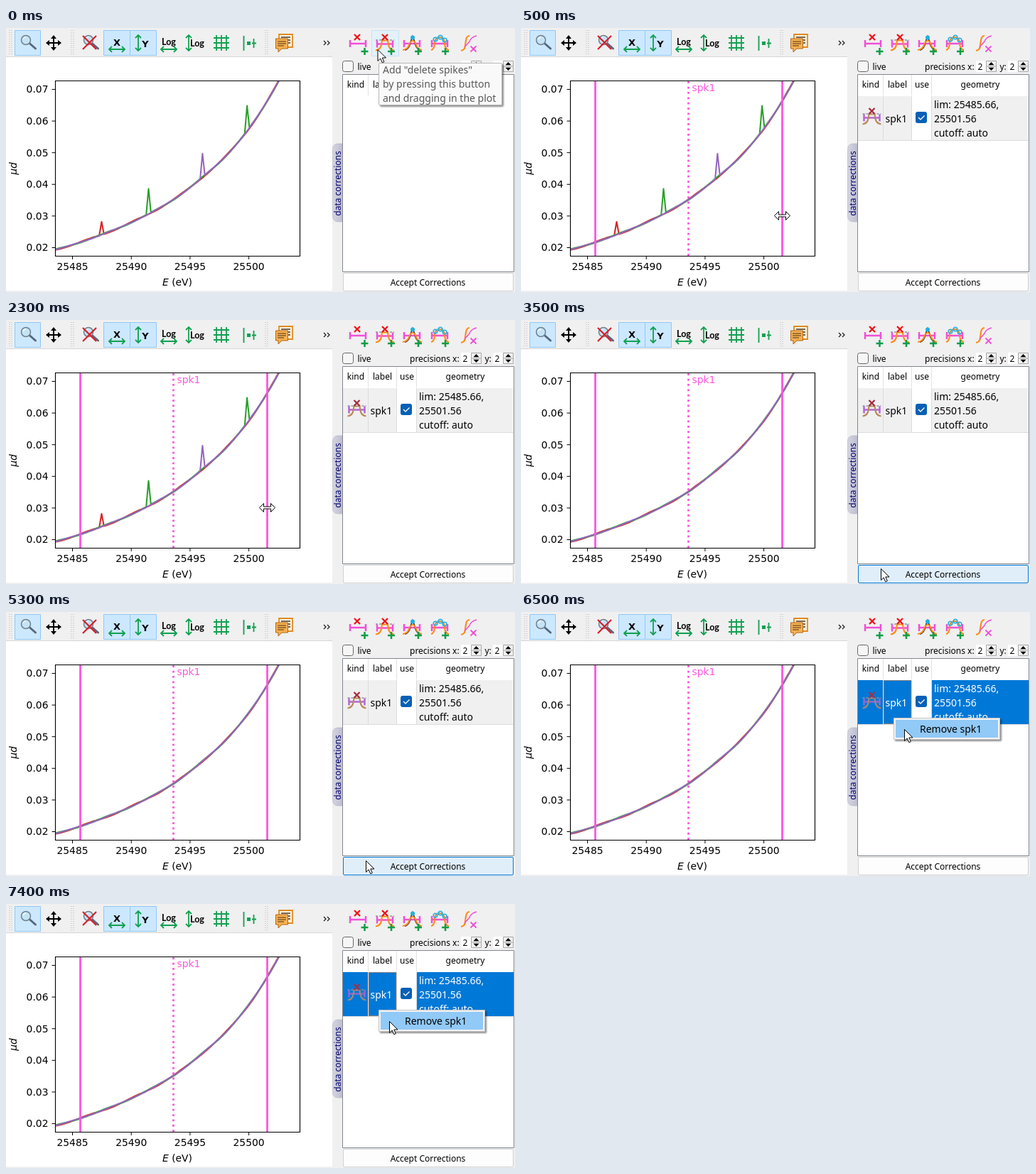
These frames come from a looping animation (716x372 px, 8000 ms). An HTML page:

```html
<!DOCTYPE html>
<html lang="en">
<head>
<meta charset="utf-8">
<title>Deleting spikes</title>
<style>
html, body { margin: 0; width: 100%; height: 100%; overflow: hidden; background: #f0f0f0; }
svg { display: block; width: 716px; height: 372px; }
text { font: 12px "Noto Sans", "Open Sans", sans-serif; }
.plot text { font: 13.89px "DejaVu Sans", sans-serif; }
.plot .italic { font-style: italic; }
.big text, text.big { font-size: 14px; }
.bold text { font: bold 12.5px Lato, sans-serif; }
.bold .axis { font: bold 13px "DejaVu Sans", sans-serif; }
.mid { text-anchor: middle; }
.end { text-anchor: end; }
.line { fill: none; stroke-width: 2.08; stroke-linejoin: round; }
.green { stroke: #10a050; fill: none; stroke-width: 1.8; }
.cross { stroke: var(--cross, #f01018); stroke-width: 2.3; }
.bar { stroke: var(--bar, #f04fd8); stroke-width: 2.5; fill: none; }
.peak { stroke: var(--peak, #ff8c1a); stroke-width: 2.2; fill: none; }
.cut { stroke: #8796a8; stroke-width: 1.4; stroke-dasharray: 3 2; }
.dim { --cross: #a8283c; --bar: #b565d8; --peak: #b98a5c; }
.picked .dim { --cross: #a03048; --bar: #9068d0; --peak: #a08878; }
.picked .cell { fill: #0078d7; }
.picked .ink text { fill: #fff; }
</style>
</head>
<body>
<svg id="stage" viewBox="0 0 716 372">
  <defs>
    <clipPath id="axes"><path d="M69 74H413V321H69Z"/></clipPath>
    <linearGradient id="tab"><stop stop-color="#d4d4e0"/><stop offset="1" stop-color="#bebed2"/></linearGradient>
    <filter id="shadow" x="-10%" y="-20%" width="125%" height="150%">
      <feDropShadow dx="2" dy="2" stdDeviation="1" flood-opacity=".45"/>
    </filter>
    <path id="arrow" d="M.5.5V16.5L4.2 13L6.8 18.8L9.3 17.7L6.8 12H12Z" fill="#fff" stroke="#000"/>
    <path id="x" d="M-4-4L4 4M4-4L-4 4"/>
    <path id="plus" d="M-5 0H5M0-5V5" stroke="#0f9d48" stroke-width="2.5"/>
    <path id="range" class="bar" d="M-11-5V5M11-5V5M-11 0H11"/>
    <path id="h-arrow" d="M-11 0H11M-7-4L-11 0L-7 4M7-4L11 0L7 4"/>
    <g id="spike">
      <path class="cut" d="M-13-5.5H13"/>
      <use href="#range"/>
      <path class="peak" d="M-13 9Q-6 8-5 1L-4-5H4L5 1Q6 8 13 9"/>
      <use href="#x" class="cross" y="-9.5"/>
    </g>
    <g id="lens">
      <path d="M5 4.500L13.500 12" stroke="#56677c" stroke-width="3" stroke-linecap="round"/>
      <circle r="6.500" fill="#c4e4f6" stroke="#72808c" stroke-width="1.500"/>
      <path d="M-4-1A4 4 0 0 1 0-4" fill="none" stroke="#fff" stroke-width="1.500"/>
    </g>
    <g id="spin">
      <path d="M0 0H14V16H0Z" fill="#fff"/>
      <path d="M14.500.500H28.500V15.500H14.500ZM14.500 8H28.500" fill="#f0f0f0" stroke="#a8a8a8"/>
      <path d="M17.500 6.200H25.500L21.500 2ZM17.500 9.800H25.500L21.500 14Z"/>
      <text x="2.500" y="12.500">2</text>
    </g>
  </defs>

  <path d="M0 0H716V372H0Z" fill="#f0f0f0"/>
  <path d="M0 41H459V370H0Z" fill="#fff"/>
  <path d="M0 40.500H459" stroke="#d5d5d5"/>

  <!-- plot toolbar -->
  <path d="M12.500 3.500H48.500V38.500H12.500ZM137.500 3.500H174.500V38.500H137.500ZM174.500 3.500H211.500V38.500H174.500Z" fill="#cce8ff" stroke="#90c8f6"/>
  <path d="M5 3V38M8 3V38M92 3V38M95 3V38M365 3V38M368 3V38" stroke="#b4b4b4" stroke-dasharray="1 2"/>
  <use href="#lens" x="28" y="17"/>
  <path d="M57 21H77M67 11V31" stroke="#000" stroke-width="2"/>
  <path d="M56 21L61 17V25ZM78 21L73 17V25ZM67 10L63 15H71ZM67 32L63 27H71Z"/>
  <use href="#lens" x="116" y="17"/>
  <path d="M108 11L127 30M127 11L108 30" stroke="#d81f2a" stroke-width="2.200"/>
  <g class="bold">
    <text x="156" y="24.500" class="mid axis">X</text>
    <text x="196" y="26.500" class="mid axis">Y</text>
    <text x="229" y="23.500" class="mid">Log</text>
    <text x="269" y="26" class="mid">Log</text>
  </g>
  <g class="green">
    <use href="#h-arrow" x="156" y="30"/>
    <use href="#h-arrow" x="229" y="30"/>
    <use href="#h-arrow" transform="translate(186 21) rotate(90)"/>
    <use href="#h-arrow" transform="translate(257 21) rotate(90)"/>
    <path d="M296 10V32M303 10V32M310 10V32M292 14H314M292 21H314M292 28H314"/>
    <path d="M334.500 11V32M348.500 15V28M346 21.500H352"/>
    <path d="M339 19H344V24H339Z" fill="#10a050" stroke="none"/>
  </g>
  <path d="M384 9H403V27H384Z" fill="#fff3dc" stroke="#e08a24" stroke-width="1.800"/>
  <path d="M387 13H400M387 17H400M392 21H400" stroke="#4a3a2c" stroke-width="1.300"/>
  <path d="M379.500 15H396.500V29H388L383 34V29H379.500Z" fill="#f8b050" stroke="#b06414"/>
  <path d="M382 19H394M382 22H394M382 25H391" stroke="#4a3014" stroke-width="1.200"/>
  <path d="M447 18L450 21L447 24M452 18L455 21L452 24" fill="none" stroke="#222" stroke-width="1.300"/>

  <!-- plot -->
  <g class="plot">
    <g clip-path="url(#axes)">
      <path id="red" class="line" stroke="#d62728"/>
      <path id="green" class="line" stroke="#2ca02c"/>
      <path id="purple" class="line" stroke="#9467bd"/>
      <g data-on="123" stroke="#ff55dd" stroke-width="2.780">
        <path d="M104.500 74V321M367.500 74V321"/>
        <path d="M235.500 321V74" stroke-dasharray="2.780 4.580"/>
        <text x="240.500" y="89" fill="#ff55dd" stroke="none">spk1</text>
      </g>
    </g>
    <path d="M69.500 74.500H413.500V321.500H69.500Z" fill="none" stroke="#000" stroke-width="1.110"/>
    <g id="ticks"></g>
    <text x="241" y="363" class="mid"><tspan class="italic">E</tspan> (eV)</text>
    <text class="mid italic" transform="translate(15 198) rotate(-90)">μd</text>
  </g>

  <!-- side panel -->
  <path d="M473 163H466Q459.500 164 459.500 171V265Q459.500 272 466 273H473Z" fill="url(#tab)" stroke="#b4b4c4" stroke-width=".6"/>
  <text class="mid" fill="#000070" transform="translate(470.500 219) rotate(-90)">data corrections</text>
  <path data-on="0" d="M514.500 3.500H552.500V39.500H514.500Z" fill="#e3f1fb" stroke="#c6e2f7"/>
  <use href="#range" x="495" y="22"/>
  <use href="#x" class="cross" x="494" y="13"/>
  <use href="#spike" x="533" y="22.500"/>
  <use href="#range" x="571" y="22"/>
  <path d="M561 31Q567 30 569 20L572 12L575 20Q577 30 583 31" fill="none" stroke="#303030" stroke-width="1.800"/>
  <path class="peak" d="M558 31Q565 30 567 24Q569 18 572 18T577 24Q579 30 585 31"/>
  <circle cx="572" cy="13.500" r="3" fill="#20b0e0"/>
  <use href="#range" x="610" y="22"/>
  <path class="peak" d="M598 31Q603 30 603 20Q604 13 610 13T617 20Q617 30 623 31"/>
  <g fill="none" stroke="#20b0e8" stroke-width="1.600"><circle cx="604" cy="16" r="2.800"/><circle cx="611" cy="13" r="2.800"/><circle cx="617" cy="17" r="2.800"/></g>
  <path class="peak" d="M640 32Q646 31 646 24L647 17Q648 11 652 11"/>
  <path d="M645 27L652 19Q654 13 662 11" fill="none" stroke="#f04fd8" stroke-width="1.500"/>
  <use href="#x" x="657.500" y="29.500" stroke="#f04fd8" stroke-width="1.800"/>
  <use href="#plus" x="504.500" y="33"/><use href="#plus" x="542" y="33"/>
  <use href="#plus" x="580" y="33"/><use href="#plus" x="618" y="33"/>

  <rect x="473.500" y="46.500" width="15" height="15" rx="3" fill="#f6f6f6" stroke="#666"/>
  <text x="494.500" y="59">live</text>
  <text x="568" y="59">precisions x:</text>
  <text x="673.500" y="59">y:</text>
  <use href="#spin" x="640" y="46"/><use href="#spin" x="685" y="46"/>

  <path d="M473.500 65.500H714.500V343.500H473.500Z" fill="#fff" stroke="#828790"/>
  <path d="M509.500 66V95M549.500 66V95M577.500 66V95" stroke="#e2e2e2"/>
  <text x="492" y="84" class="mid">kind</text>
  <text x="529.500" y="84" class="mid">label</text>
  <text x="564" y="84" class="mid">use</text>
  <text x="646" y="84" class="mid">geometry</text>
  <g id="row" data-on="123">
    <path class="cell" d="M474 96H549V158H474ZM578 96H714V158H578Z" fill="#f0f0f0"/>
    <path d="M509.500 96V158M549.500 96V158M577.500 96V158M474 158.500H714" stroke="#dcdcdc"/>
    <use href="#spike" class="dim" x="493.500" y="126.500"/>
    <g class="big ink">
      <text x="512.500" y="133">spk1</text>
      <text x="581" y="112.500">lim: 25485.66,</text>
      <text x="581" y="132.500">25501.56</text>
      <text x="581" y="153">cutoff: auto</text>
    </g>
    <rect x="555" y="118" width="16" height="16" rx="3" fill="#0560b6"/>
    <path d="M559 126L562 129L567.500 123.500" fill="none" stroke="#fff" stroke-width="1.300"/>
    <path data-on="3" d="M510.500 96.500H549V157.500H510.500Z" fill="none" stroke="#ff8728" stroke-dasharray="1 1"/>
  </g>

  <rect id="accept" x="474.500" y="345.500" width="239" height="25" rx="1.500" fill="#fdfdfd" stroke="#d0d0d0"/>
  <text x="593.500" y="363" class="mid">Accept Corrections</text>

  <!-- pop-ups and pointers -->
  <g data-on="0">
    <rect x="524.500" y="49.500" width="173" height="59" rx="1.500" fill="#f9f9f9" stroke="#b8b8b8" filter="url(#shadow)"/>
    <g class="big" fill="#575757">
      <text x="530" y="64">Add "delete spikes"</text>
      <text x="530" y="84">by pressing this button</text>
      <text x="530" y="104">and dragging in the plot</text>
    </g>
    <use href="#arrow" x="522.500" y="30"/>
  </g>
  <path data-on="1" d="M356.500 264.500L362.500 258.500V263H372.500V258.500L378.500 264.500L372.500 270.500V266H362.500V270.500Z" fill="#fff" stroke="#000"/>
  <use data-on="2" href="#arrow" x="506" y="350"/>
  <g data-on="3">
    <path d="M524.500 149.500H673.500V179.500H524.500Z" fill="#f2f2f2" stroke="#c4c4c4" filter="url(#shadow)"/>
    <path d="M527 152H671V177H527Z" fill="#91c9f7"/>
    <text x="561" y="170" class="big">Remove spk1</text>
    <use href="#arrow" x="539" y="165"/>
  </g>
</svg>
<script>
const $ = id => document.getElementById(id);
const STARTS = [0, 500, 3500, 6500], LOOP = 8000;

let ticks = "";
for (let i = 0; i < 6; i++) {
  const y = 309.5 - 44.6 * i;
  ticks += `<path d="M64.500 ${y}H69" stroke="#000"/><text x="59.500" y="${Math.round(y + 4.9)}" class="end">0.0${i + 2}</text>`;
}
for (let i = 0; i < 4; i++) {
  const x = 93.5 + 82.7 * i;
  ticks += `<path d="M${x} 321V326" stroke="#000"/><text x="${x}" y="341" class="mid">${25485 + 5 * i}</text>`;
}
$("ticks").innerHTML = ticks;

// Spectrum: Catmull-Rom through knots 35 px apart, starting at x = 34
const KNOTS = [321, 312.5, 302, 289.5, 275, 257.5, 236, 208, 175.5, 131.5, 74, 3];
function spectrum(x) {
  const u = (x - 34) / 35, k = Math.min(9, Math.max(1, Math.floor(u))), t = u - k;
  const [a, b, c, d] = KNOTS.slice(k - 1, k + 3);
  return b + t / 2 * (c - a + t * (2 * a - 5 * b + 4 * c - d + t * (3 * (b - c) + d - a)));
}

// spikes maps a sample index to the height of its peak; crest is an x where the wobble rises most
function curve(spikes, wobble, crest) {
  const points = [];
  for (let i = 0; i < 97; i++) {
    const x = 68.5 + 3.3 * i;
    const y = spikes[i] ?? spectrum(x) - wobble * Math.cos((x - crest) / 10.5);
    points.push(x.toFixed(1) + " " + y.toFixed(1));
  }
  return "M" + points.join("L");
}

function show(scene) {
  for (const el of document.querySelectorAll("[data-on]"))
    el.style.display = el.dataset.on.includes(scene) ? "" : "none";
  const spiky = scene < 2;
  $("red").setAttribute("d", curve(spiky ? { 20: 273 } : {}, 0.9, 115));
  $("green").setAttribute("d", curve(spiky ? { 40: 226.5, 82: 109.5 } : {}, 0.7, 205));
  $("purple").setAttribute("d", curve(spiky ? { 63: 177 } : {}, 0.3, 90));
  $("row").classList.toggle("picked", scene === 3);
  $("accept").setAttribute("fill", scene === 2 ? "#e0eef9" : "#fdfdfd");
  $("accept").setAttribute("stroke", scene === 2 ? "#0078d4" : "#d0d0d0");
}

let current = -1;
const begin = performance.now();
function frame(now) {
  const t = Math.max(0, now - begin) % LOOP;
  const scene = STARTS.findLastIndex(start => t >= start);
  if (scene !== current) show(current = scene);
  requestAnimationFrame(frame);
}
frame(begin);
</script>
</body>
</html>
```
